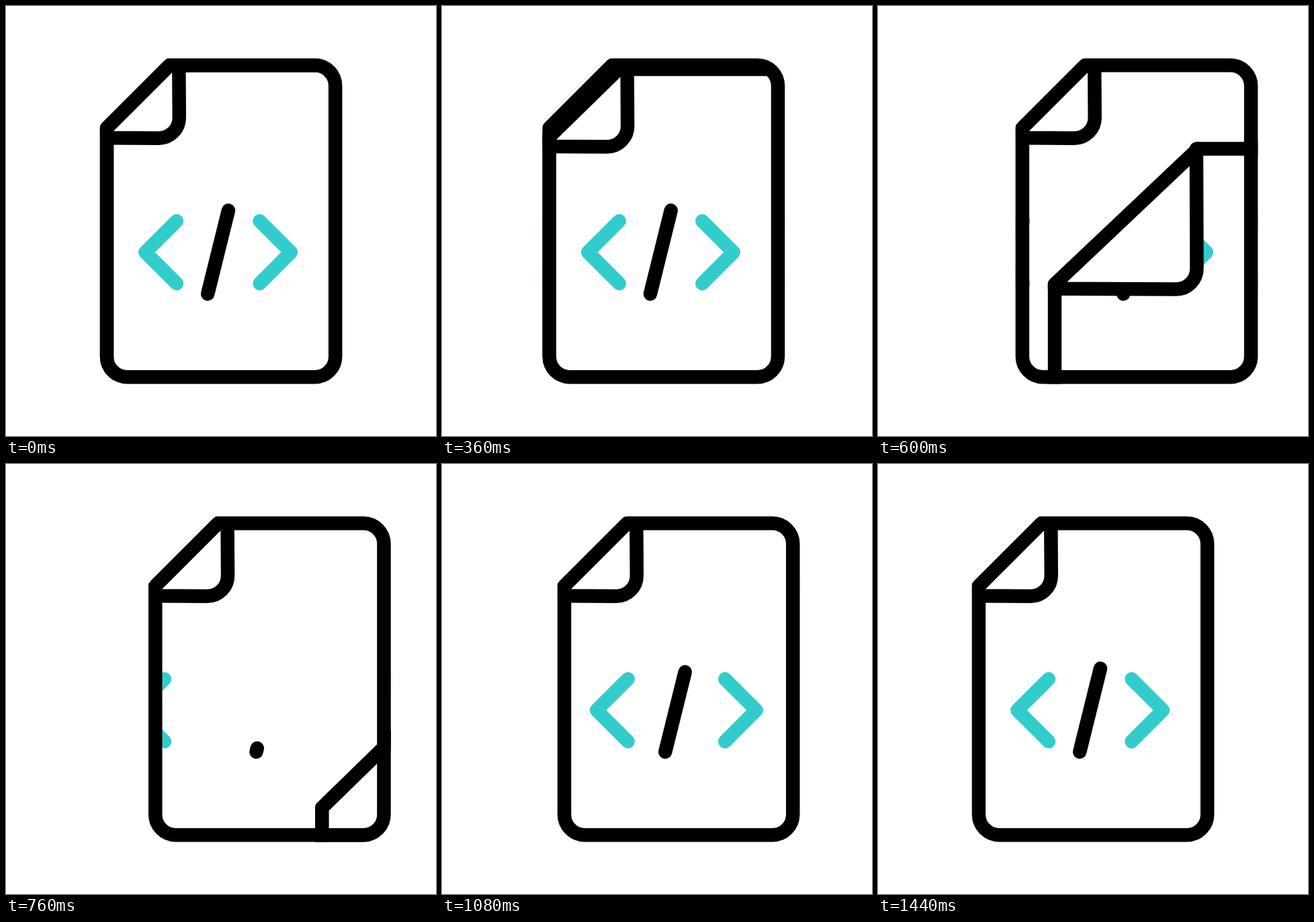
Recreate the animation shown at these times as an HTML page with a canvas. Size 640x640 px, loop 2000 ms.

```html
<!DOCTYPE html>
<html lang="en">
<head>
<meta charset="utf-8">
<title>Code file page turn</title>
<style>
  html, body { margin: 0; width: 100%; height: 100%; overflow: hidden; background: #fff; }
  canvas { display: block; }
</style>
</head>
<body>
<canvas id="stage" width="640" height="640"></canvas>
<script>
const ctx = document.getElementById('stage').getContext('2d');
const LOOP = 2000, STEP = 40;
const BLACK = '#000', TEAL = '#33cccc', WHITE = '#fff';
const LEFT = 150, RIGHT = 490.2, TOP = 88.3, BOTTOM = 552.3, RADIUS = 30.5;

// Poses of the turning sheet: progress, fold top, fold end, flap corner
const POSES = [
  { p: 0,     top: [243.3, 88.3], end: [150, 181.5],   corner: [258, 197] },
  { p: 0.168, top: [300, 121.3],  end: [144, 263],     corner: [307.5, 270] },
  { p: 0.41,  top: [381, 168],    end: [140, 380],     corner: [377.5, 375] },
  { p: 0.517, top: [411, 212.3],  end: [197.8, 414],   corner: [409.5, 421.3] },
  { p: 1,     top: [573, 454],    end: [477, 550],     corner: [552, 629] }
];

// Cubic easing with handles (0.54, 0) and (0.27, 1)
function ease(t, start, duration) {
  const u = (t - start) / duration;
  if (u <= 0) return 0;
  if (u >= 1) return 1;
  let lo = 0, hi = 1;
  for (let i = 0; i < 24; i++) {
    const s = (lo + hi) / 2, r = 1 - s;
    const x = 3 * s * r * r * 0.54 + 3 * s * s * r * 0.27 + s * s * s;
    if (x < u) lo = s; else hi = s;
  }
  return lo * lo * (3 - 2 * lo);
}

const mix = (a, b, k) => a + (b - a) * k;
const mixPoint = (a, b, k) => [mix(a[0], b[0], k), mix(a[1], b[1], k)];

function poseAt(p) {
  const i = Math.max(1, POSES.findIndex(pose => pose.p >= p));
  const a = POSES[i - 1], b = POSES[i];
  const k = (p - a.p) / (b.p - a.p);
  return {
    top: mixPoint(a.top, b.top, k),
    end: mixPoint(a.end, b.end, k),
    corner: mixPoint(a.corner, b.corner, k)
  };
}

function polyline(points) {
  const path = new Path2D();
  points.forEach(([x, y]) => path.lineTo(x, y));
  return path;
}

function stroke(path, color = BLACK) {
  ctx.strokeStyle = color;
  ctx.stroke(path);
}

function pagePath(grow = 0) {
  const l = LEFT - grow, r = RIGHT + grow, t = TOP - grow, b = BOTTOM + grow;
  const radius = RADIUS + grow;
  const path = new Path2D();
  path.moveTo(243.3 - grow * 0.4, t);
  path.arcTo(r, t, r, b, radius);
  path.arcTo(r, b, l, b, radius);
  path.arcTo(l, b, l, t, radius);
  path.lineTo(l, 181.5 - grow * 0.4);
  path.closePath();
  return path;
}

const PAGE = pagePath(), PAGE_OUTER = pagePath(10.2);

function drawCode(shiftLeft, shiftRight, grown) {
  const chevron = (x, tip) => stroke(polyline([[x, 320], [tip, 366.5], [x, 413]]), TEAL);
  chevron(254 - shiftLeft, 207.3 - shiftLeft);
  chevron(377.5 + shiftRight, 424 + shiftRight);
  if (grown > 0) {
    const foot = [300.2, 428.5];
    stroke(polyline([foot, mixPoint(foot, [331, 304.3], grown)]));
  }
}

function drawFlap({ top, end, corner }) {
  const path = new Path2D();
  path.moveTo(...top);
  path.lineTo(corner[0] - 0.7, top[1]);
  path.arcTo(corner[0], corner[1], end[0], corner[1] - 0.7, RADIUS);
  path.lineTo(end[0], corner[1] - 0.7);
  path.lineTo(...end);
  path.closePath();
  ctx.fillStyle = WHITE;
  ctx.fill(path);
  stroke(path);
}

function drawSheet(pose) {
  const { top, end } = pose;
  const sheet = polyline([[end[0], 620], end, top, [620, top[1]], [620, 620]]);
  ctx.fillStyle = WHITE;
  ctx.fill(sheet);
  ctx.save();
  ctx.clip(sheet);
  drawCode(0, 0, 1);
  ctx.restore();
  stroke(sheet);
  drawFlap(pose);
}

function draw(t) {
  const offset = 72.5 * (ease(t, 200, 600) - ease(t, 803, 615));
  const turn = ease(t, 244, 818);
  const away = 1 - ease(t, 568, 747);

  ctx.fillStyle = WHITE;
  ctx.fillRect(0, 0, 640, 640);
  ctx.save();
  ctx.translate(offset, 0);
  ctx.lineWidth = 20.5;
  ctx.lineCap = ctx.lineJoin = 'round';

  ctx.save();
  ctx.clip(PAGE_OUTER);
  if (turn > 0) {
    drawCode(103 * away, 129 * away, ease(t, 670, 530));
    drawFlap(POSES[0]);
  }
  if (turn < 1) drawSheet(poseAt(turn));
  ctx.restore();

  stroke(PAGE);
  ctx.restore();
}

function tick() {
  const t = performance.now() % LOOP;
  draw(Math.floor(t / STEP) * STEP);
  requestAnimationFrame(tick);
}
tick();
</script>
</body>
</html>
```
